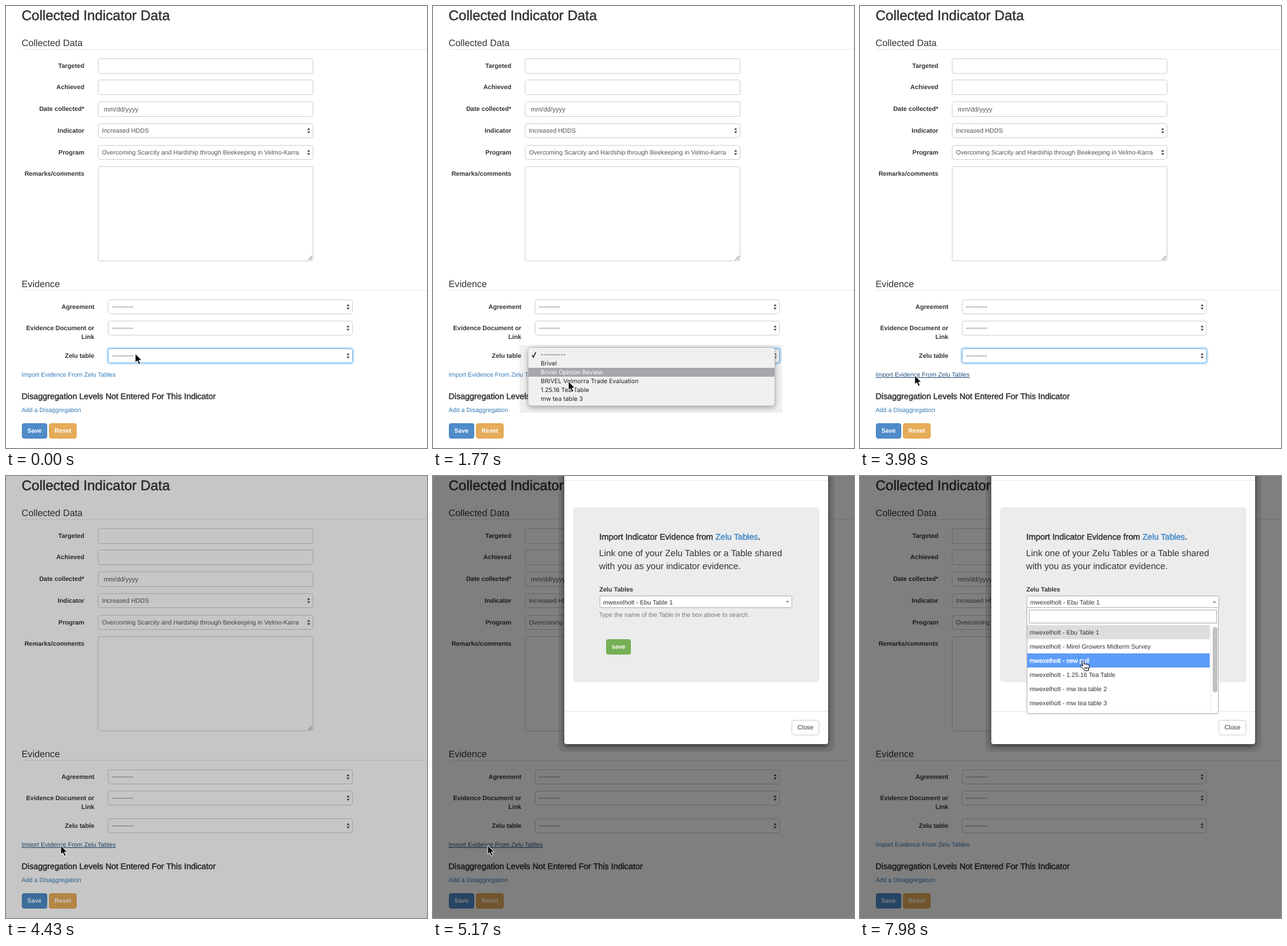
Write an HTML page that moves like this. It is 715x750 px and loops after 8000 ms.

```html
<!DOCTYPE html>
<html lang="en">
<head>
<meta charset="utf-8">
<title>Collected Indicator Data</title>
<style>
html, body { margin: 0; width: 100%; height: 100%; overflow: hidden; background: #fff; }
svg { display: block; font-family: "Liberation Sans", Arial, sans-serif; fill: #333; }
text { white-space: pre; text-rendering: geometricPrecision; }
.b { font-weight: 700; }
.r { text-anchor: end; }
.c { text-anchor: middle; }
.medium { stroke: #333; stroke-width: .5; }
.link { fill: #337ab7; }
.medium .link { fill: #428bca; stroke: #428bca; }
.hover { fill: #23527c; text-decoration: underline; }
.menu { font-family: Inter, "Liberation Sans", sans-serif; }
</style>
</head>
<body>
<svg id="stage" width="715" height="750"></svg>
<script>
const USER = 'mwexelholt - ';
const SELECTED = USER + 'Ebu Table 1';
const MENU = ['---------', 'Brivel', 'Brivel Opinion Review',
  'BRIVEL Velmorra Trade Evaluation', '1.25.16 Tea Table', 'mw tea table 3'];
const TABLES = ['Ebu Table 1', 'Mirel Growers Midterm Survey', 'new pull',
  '1.25.16 Tea Table', 'mw tea table 2', 'mw tea table 3'];
const FIELDS = ['Targeted', 'Achieved', 'Date collected*', 'Indicator', 'Program', 'Remarks/comments'];
const PROGRAM = 'Overcoming Scarcity and Hardship through Beekeeping in Velmo-Karra';

const text = (s, x, y, size, attrs = '') =>
  `<text x="${x}" y="${y}" font-size="${size}" ${attrs}>${s}</text>`;
const rect = (x, y, w, h, fill, attrs = '') =>
  `<rect x="${x}" y="${y}" width="${w}" height="${h}" fill="${fill}" ${attrs}/>`;
const path = (d, attrs = '') => `<path d="${d}" ${attrs}/>`;
const group = (id, ...parts) => `<g id="${id}">${parts.join('')}</g>`;
const rule = (x, y, w) => rect(x, y, w, 1, '#e5e5e5');
const box = (x, y, w, h, line = '#ccc', rx = 3, attrs = '') =>
  rect(x + .5, y + .5, w - 1, h - 1, '#fff', `stroke="${line}" rx="${rx}" ${attrs}`);
const label = (s, right, y) => text(s, right, y, 10.7, 'class="b r"');
const value = (s, x, y, size = 10.6) => text(s, x, y, size, 'fill="#555"');
const heading = (s, y) => text(s, 26.5, y, 15.8) + rule(27, y + 5, 688);
const button = (s, x, y, w, fill, line) =>
  rect(x + .5, y + .5, w - 1, 25, fill, `stroke="${line}" rx="3"`) +
  text(s, x + w / 2, y + 16, 10.4, 'class="b c" fill="#fff"');
const select = (s, x, y, w, size, attrs) => box(x, y, w, 25, '#ccc', 4, attrs) +
  value(s, x + 7, y + 16, size) +
  path(`M${x + w - 10.5} ${y + 11.3}h5l-2.5 -3.6zM${x + w - 10.5} ${y + 13.7}h5l-2.5 3.6z`, 'fill="#444"');
const evidence = (s, y, attrs) =>
  label(s, 150, y + 16) + select('---------', 173, y, 416, 12, attrs);

function field(s, i) {
  const y = Math.floor(89 + 36.75 * i);
  const input = i == 5 ? box(156, y, 366, 161)
    : i == 4 ? select(PROGRAM, 156, y, 366)
    : i == 3 ? select('Increased HDDS', 156, y, 366)
    : box(156, y, 366, 26) + (i == 2 ? value('mm/dd/yyyy', 166, y + 17, 11) : '');
  return label(s, 133, y + 16) + input;
}

const page = group('page',
  text('Collected Indicator Data', 26.5, 24, 23.6, 'class="medium"'),
  heading('Collected Data', 68),
  ...FIELDS.map(field),
  path('M513 431l7 -7M517 431l3 -3', 'stroke="#555"'),
  heading('Evidence', 477),
  evidence('Agreement', 498),
  evidence('Evidence Document or', 534), label('Link', 150, 565),
  rect(172, 580, 418, 27, 'none', 'id="glow" stroke="#66afe9" stroke-opacity=".35" stroke-width="3" rx="5"'),
  evidence('Zelu table', 581, 'id="field"'),
  text('Import Evidence From Zelu Tables', 26.5, 629, 10.5, 'id="import"'),
  text('Disaggregation Levels Not Entered For This Indicator', 26.5, 667, 14, 'class="medium"'),
  text('Add a Disaggregation', 26.5, 689, 10.5, 'class="link"'),
  button('Save', 27, 708, 43, '#4f8cc9', '#427fbc'),
  button('Reset', 73, 708, 47, '#e6ac59', '#e0a24a'));

const popup = group('popup',
  rect(147, 575, 446, 115, '#000', 'opacity=".06"'),
  rect(161.5, 579.5, 419, 99, '#f0f0f0',
    'rx="5" stroke="#bbb" style="filter:drop-shadow(0 3px 4px rgba(0,0,0,.3))"'),
  rect(162, 584, 418, 15, '#a7a6ab', 'id="bar"'),
  path('M168.5 592.5l2 3.5 4 -8.5', 'id="check" fill="none" stroke-width="1.7"'),
  ...MENU.map((s, i) => text(s, 183, 595 + 15 * i, 10.3, 'class="menu item"')));

const modal = group('modal',
  rect(213, -20, 469, 488, '#000', 'rx="10" opacity=".08"'),
  rect(223, -20, 448, 475, '#fff',
    'rx="4" style="filter:drop-shadow(0 3px 4px rgba(0,0,0,.6))"'),
  rule(223, 7, 448),
  rect(238, 53, 418, 297, '#ececec', 'rx="5"'),
  text('Import Indicator Evidence from <tspan class="link">Zelu Tables</tspan>.',
    282.5, 108, 14.2, 'class="medium"'),
  text('Link one of your Zelu Tables or a Table shared', 282, 136, 15.2),
  text('with you as your indicator evidence.', 282, 158, 15.2),
  text('Zelu Tables', 282.5, 196, 10.6, 'class="b"'),
  box(283, 203, 327, 21, '#aaa'),
  text(SELECTED, 289, 218, 10.6),
  path('', 'id="caret" fill="#888"'),
  text('Type the name of the Table in the box above to search.', 282, 239, 10.5, 'fill="#777"'),
  button('save', 294, 277, 42, '#77b056', '#70a950'),
  rule(223, 399, 448),
  box(609, 414, 47, 26), text('Close', 632.5, 430, 10.6, 'class="c"'));

const list = group('list',
  box(283, 223, 326, 181, '#aaa', 1),
  box(287, 227, 319, 23, '#aaa', 0),
  ...TABLES.map((s, i) =>
    rect(284, 253 + 24 * i, 310, 24, '#fff', 'class="row"') +
    text(USER + s, 288, 269 + 24 * i, 10.6, 'class="name" stroke-width=".4"')),
  rect(595, 252, 1, 151, '#e8e8e8'),
  rect(599, 256, 8, 111, '#c1c1c1', 'rx="4"'));

const cursor = group('cursor',
  path('M0 0V15L3.5 12 6 18 8.8 17 6.2 11H11Z', 'id="arrow" fill="#000" stroke="#fff"'),
  path('M0 1.5c0-2 2.5-2 3 0l1 4c1-1 2.5-.5 3 .5 1-1 2.5-.5 3 .5 2-.5 2.5 1 2.5 3l-1 4-.5 3H4.5L2 13-2.5 9c-1-2 1-2.5 2.5-1.5l1.5 1z' +
    'M5 10v4M7.5 10v4M10 10v4', 'id="hand" fill="#fff" stroke="#000"'));

const $ = id => document.getElementById(id);
$('stage').innerHTML = page + popup + rect(0, 0, 715, 750, '#000', 'id="dim"') + modal + list + cursor;
const all = name => [...document.querySelectorAll('.' + name)];
const items = all('item'), rows = all('row'), names = all('name');

// The screen refreshes once per tick; all moments below are in ticks
const LOOP = 8000, TICK = 147.6, LEAD = 9;
const MENU_OPEN = 9, MENU_CLOSE = 20, CLICK = 28, MODAL = 35, HAND = 40, LIST = 42;

// Pointer moves: start, end, x, y
const MOVES = [
  [1, 4, 93, 626], [6, 8, 222, 592],
  [11, 12, 230, 637], [12, 15, 238, 681], [15, 19, 235, 594],
  [19, 24, 26, 628], [24, 27, 93, 627], [35, 40, 361, 213],
  [45, 46, 361, 257], [46, 50, 381, 347], [51, 54, 377, 314]
];
const clamp = (v, lo, hi) => Math.min(hi, Math.max(lo, v));
const easeOut = p => p * (2 - p);

function pointer(n) {
  let x = 219.5, y = 590;
  for (const [from, to, toX, toY] of MOVES) {
    const p = easeOut(clamp((n - from) / (to - from), 0, 1));
    x += (toX - x) * p;
    y += (toY - y) * p;
  }
  return { x, y };
}

// Highlights trail the pointer by half a tick
const rowUnder = (n, top, height) =>
  clamp(Math.floor((pointer(n - .5).y - top) / height), 0, 5);

const show = (id, on) => $(id).style.display = on ? '' : 'none';

function draw(n) {
  const { x, y } = pointer(n);
  const menuOpen = n >= MENU_OPEN && n < MENU_CLOSE, listOpen = n >= LIST, focused = n < CLICK;

  show('glow', focused);
  $('field').setAttribute('stroke', focused ? '#66afe9' : '#ccc');
  $('import').setAttribute('class', y > 615 && x < 188 ? 'hover' : 'link');
  $('dim').setAttribute('opacity', .5 * clamp((n - CLICK) / 3, 0, 1) ** 2);

  show('popup', menuOpen);
  const item = rowUnder(n, 584, 15);
  $('bar').setAttribute('y', 584 + 15 * item);
  $('check').setAttribute('stroke', item ? '#222' : '#fff');
  items.forEach((el, i) => el.setAttribute('fill', i === item ? '#fff' : '#222'));

  show('modal', n >= MODAL);
  show('list', listOpen);
  $('caret').setAttribute('d', listOpen ? 'M599 215h6l-3 -3z' : 'M599 212h6l-3 3z');
  const row = rowUnder(n, 253, 24);
  rows.forEach((el, i) => {
    const on = i === row;
    el.setAttribute('fill', on ? '#5d9cf8' : i ? '#fff' : '#ddd');
    names[i].setAttribute('fill', on ? '#fff' : '#333');
    names[i].setAttribute('stroke', on ? '#fff' : 'none');
  });

  $('cursor').setAttribute('transform', `translate(${x} ${y})`);
  show('hand', n >= HAND);
  show('arrow', n < HAND);
}

const start = performance.now();
function frame() {
  const t = (performance.now() - start) % LOOP;
  draw(Math.floor((t + LEAD) / TICK));
  requestAnimationFrame(frame);
}
frame();
</script>
</body>
</html>
```
